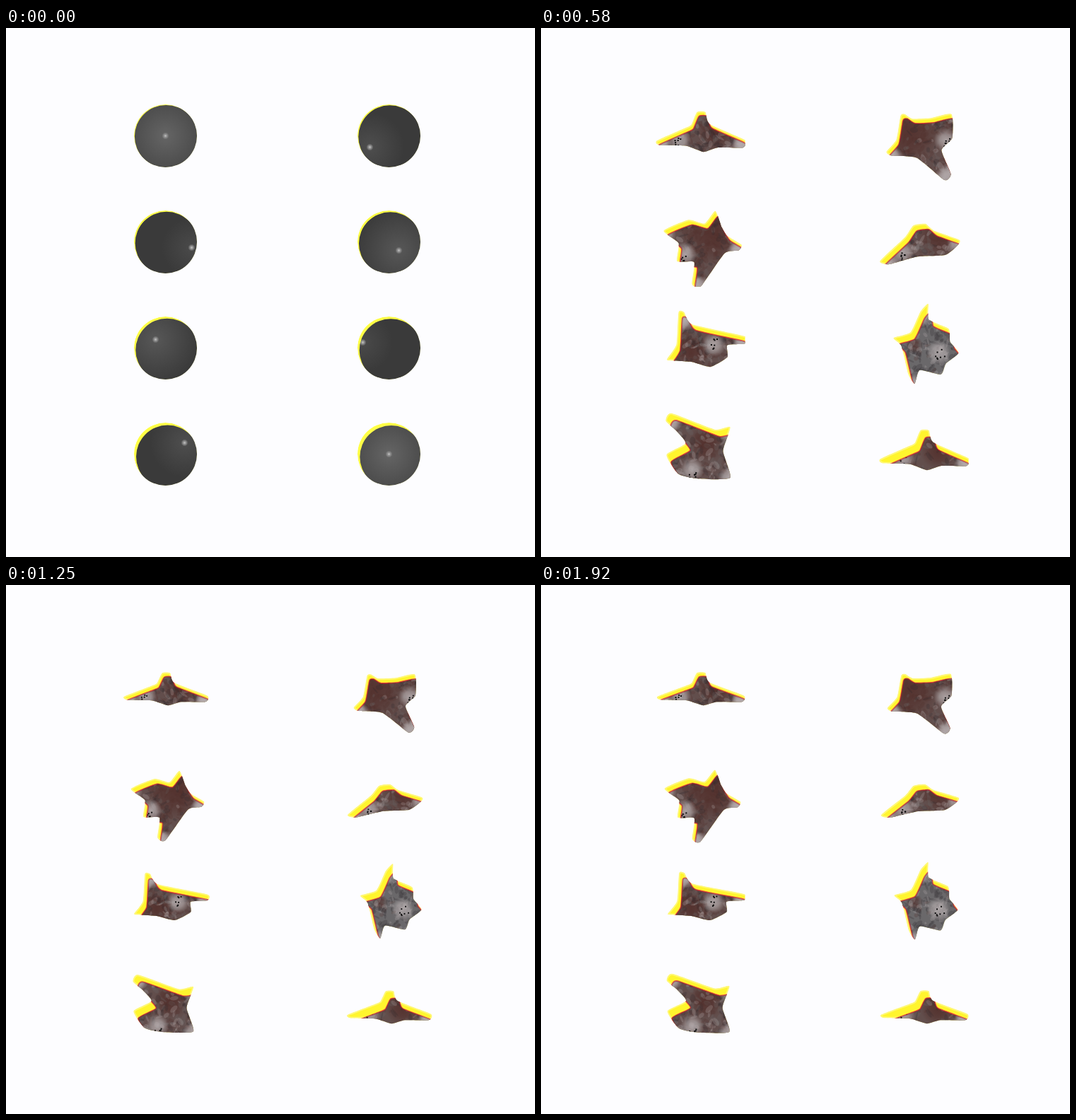
These frames come from a looping animation (748x748 px, 2.01 s). An HTML page with a canvas:

```html
<!DOCTYPE html>
<html lang="en">
<head>
<meta charset="utf-8">
<title>Eight views of a morphing shape</title>
<style>
html, body { margin: 0; width: 100%; height: 100%; overflow: hidden; background: #fdfdff; }
canvas { display: block; }
</style>
</head>
<body>
<canvas id="stage" width="748" height="748"></canvas>
<script>
const ctx = document.getElementById('stage').getContext('2d');
const LOOP = 2010, CYCLE = 500, RADIUS = 44.5, HALF_CELL = 63;
const DARK = '42,41,43', GRAY = '106,104,106', LIGHT = '184,176,177', MAROON = '82,46,42', BROWN = '98,78,76';

// Key points of each silhouette, its palest spot, and how reddish its skin is.
const views = [
  { outline: '-62,5 -22,-10 -13,-14 -5,-29 7,-29 13,-15 63,4 60,13 24,13 4,18 -20,11 -58,10', pale: [-30, 6], redness: .4 },
  { outline: '-53,22 -39,6 -33,-25 -27,-27 -16,-21 10,-22 39,-27 40,4 25,20 38,51 29,59 -10,30 -46,27', pale: [31, 6], redness: .8 },
  { outline: '-52,-15 -17,-30 6,-25 21,-42 30,-20 38,-8 58,4 54,12 34,16 0,62 -12,58 -9,28 -33,27 -31,2', pale: [-22, 17], redness: .8 },
  { outline: '-62,23 -27,-5 -15,-19 2,-21 14,-13 50,-2 47,5 30,16 -10,18 -50,27', pale: [-30, 14], redness: .5 },
  { outline: '-47,12 -34,-6 -31,-46 -23,-46 -12,-31 63,-16 63,-7 38,-5 38,10 14,22 -12,16 -44,14', pale: [19, -5], redness: .4 },
  { outline: '-43,-14 -19,-22 -5,-51 6,-62 7,-40 35,-27 37,-9 49,7 31,22 24,37 -6,31 -13,50 -22,37 -32,-3', pale: [20, 6], redness: .1 },
  { outline: '-49,-44 -41,-54 20,-33 42,-36 32,-5 42,30 -2,31 -31,25 -48,0 -21,-15 -35,-32', pale: [-12, 22], redness: .4 }
];
views.push({ ...views[0] });

// The second half of the views sees the highlight mirrored through the centre.
const glints = [[0, 0], [-27, 16], [37, 8], [14, 12]];

views.forEach((view, index) => {
  view.index = index;
  view.cx = index % 2 ? 541.5 : 225.5;
  view.cy = 152.5 + 150 * (index >> 1);
  view.points = view.outline.split(' ').map(pair => pair.split(',').map(Number));
  const ys = view.points.map(p => p[1]);
  const top = Math.min(...ys), bottom = Math.max(...ys);
  view.middle = (top + bottom) / 2;
  view.swell = Math.max(0, 115 - (bottom - top)) / 150; // flat views start out plumper
  view.glint = index < 4 ? glints[index] : glints[7 - index].map(v => -v);
});

const mix = (a, b, t) => a + (b - a) * t;
const clamp = v => Math.min(1, Math.max(0, v));

// Six ticks per cycle, the fourth one held for two.
function heldTime(time) {
  const tick = Math.floor((time % CYCLE + 4) / (CYCLE / 6));
  return Math.floor(time / CYCLE) * CYCLE + (tick === 4 ? 3 : tick) * CYCLE / 6;
}

function poseAt(time) {
  return {
    morph: clamp(time / 250),
    plump: Math.exp(-Math.max(0, time - 250) / 400),
    scale: 1 - .1 * Math.exp(-(((time - 1500) / 360) ** 2))
  };
}

function randomFrom(seed) {
  return () => {
    seed = Math.imul(seed, 1664525) + 1013904223 >>> 0;
    return seed / 4294967296;
  };
}

function silhouette(view, { morph, plump, scale }) {
  const path = new Path2D();
  if (morph === 0) {
    path.arc(0, 0, RADIUS, 0, 7);
    return path;
  }
  const points = view.points.map(([x, y]) => {
    const py = view.middle + (y - view.middle) * (1 + view.swell * plump);
    const size = scale * mix(RADIUS / Math.hypot(x, py), 1, morph);
    return [x * size, py * size];
  });
  const at = i => points[(i + points.length) % points.length];
  const slack = mix(5, 11, morph);
  path.moveTo(...points[0]);
  points.forEach((p, i) => {
    const before = at(i - 1), q = at(i + 1), after = at(i + 2);
    path.bezierCurveTo(p[0] + (q[0] - before[0]) / slack, p[1] + (q[1] - before[1]) / slack,
      q[0] - (after[0] - p[0]) / slack, q[1] - (after[1] - p[1]) / slack, ...q);
  });
  path.closePath();
  return path;
}

function softSpot(x, y, r, color) {
  const fill = ctx.createRadialGradient(x, y, 0, x, y, r);
  fill.addColorStop(0, `rgba(${color},.85)`);
  fill.addColorStop(.5, `rgba(${color},.6)`);
  fill.addColorStop(1, `rgba(${color},0)`);
  ctx.fillStyle = fill;
  ctx.fillRect(x - r, y - r, 2 * r, 2 * r);
}

function paintSkin({ index, points, pale: [px, py], redness }) {
  const random = randomFrom(index * 97 + 11);
  const spread = size => (random() - .5) * size;
  ctx.fillStyle = `rgb(${redness > .2 ? BROWN : GRAY})`;
  ctx.fillRect(-70, -70, 140, 140);
  softSpot(-px * .7, -py * .7, 45 * redness + 8, MAROON);
  const tones = [DARK, DARK, GRAY, LIGHT];
  for (let i = 0; i < 420; i++) {
    const color = random() < redness * .7 ? MAROON : tones[random() * 4 | 0];
    ctx.fillStyle = `rgba(${color},.24)`;
    ctx.beginPath();
    ctx.ellipse(spread(130), spread(126), 2 + random() * 6, 1 + random() * 3, random() * 3, 0, 7);
    ctx.fill();
  }
  softSpot(px, py, 17, LIGHT);
  for (const [x, y] of points) {
    if (Math.hypot(x, y) > 50) softSpot(x * .95, y * .95 + 4, 15, LIGHT);
  }
  ctx.fillStyle = '#0a0a0a';
  for (let i = 0; i < 7; i++) ctx.fillRect(px * 1.1 + spread(14), py * 1.3 + spread(14), 2, 2);
}

function paintBall([x, y]) {
  const offset = Math.hypot(x, y), reach = 80 - offset, inner = 98 - offset * .7;
  const shade = ctx.createRadialGradient(x, y, 0, x, y, reach);
  shade.addColorStop(0, '#c4c4c4');
  shade.addColorStop(2 / reach, '#929292');
  shade.addColorStop(5 / reach, `rgb(${inner},${inner},${inner})`);
  shade.addColorStop(1, '#3a3a3a');
  ctx.fillStyle = shade;
  ctx.fillRect(-70, -70, 140, 140);
}

function strokeShape(shape, color, width, alpha) {
  ctx.globalAlpha = alpha;
  ctx.strokeStyle = color;
  ctx.lineWidth = width;
  ctx.stroke(shape);
  ctx.globalAlpha = 1;
}

// A yellow silhouette, covered by the body sliding down and to the right inside it.
function drawView(view, pose) {
  const shape = silhouette(view, pose), { index } = view, { morph, scale } = pose;
  const dx = mix(.9 + index * .35, 3 + index * .6, morph);
  const dy = mix(.9 + index * .45, 6 + index * .7, morph);
  ctx.save();
  ctx.translate(view.cx, view.cy);
  ctx.beginPath();
  ctx.rect(-HALF_CELL, -HALF_CELL, 2 * HALF_CELL, 2 * HALF_CELL);
  ctx.clip();
  ctx.clip(shape);
  ctx.fillStyle = morph ? '#fff52e' : '#ffff46';
  ctx.fill(shape);
  strokeShape(shape, '#fff995', 4, morph * .7);

  ctx.translate(dx, dy);
  strokeShape(shape, '#ee3038', 2, morph * .9);
  ctx.clip(shape);
  ctx.translate(-dx, -dy);
  if (morph) {
    ctx.save();
    ctx.scale(scale, scale);
    paintSkin(view);
    ctx.restore();
  }
  ctx.globalAlpha = 1 - morph;
  paintBall(view.glint);
  ctx.translate(dx, dy);
  strokeShape(shape, '#b02228', 2, morph * .5);
  ctx.restore();
}

let shown = -1;
function tick() {
  const time = heldTime(performance.now() % LOOP);
  if (time !== shown) {
    shown = time;
    ctx.fillStyle = '#fdfdff';
    ctx.fillRect(0, 0, 748, 748);
    const pose = poseAt(time);
    views.forEach(view => drawView(view, pose));
  }
  requestAnimationFrame(tick);
}
tick();
</script>
</body>
</html>
```
